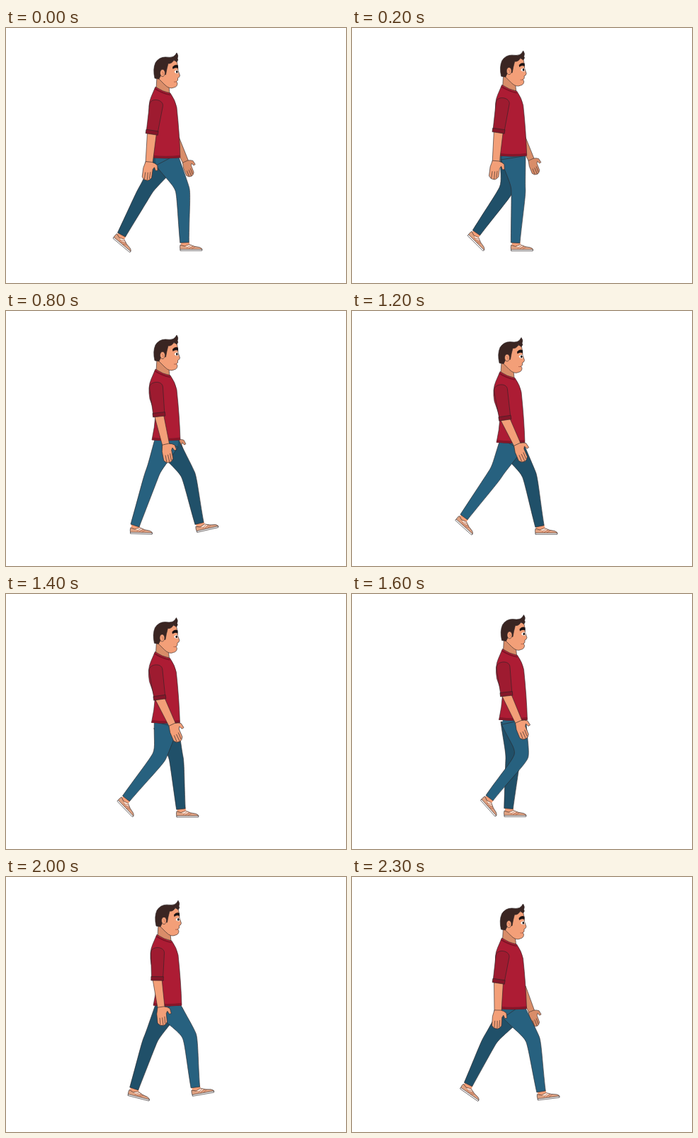
An HTML page that plays this animation: 480x360 px, repeating every 2.4 s.

```html
<!DOCTYPE html>
<html lang="en">
<head>
<meta charset="utf-8">
<title>Walk cycle</title>
<style>
  html, body { margin: 0; width: 100%; height: 100%; overflow: hidden; background: #fff; }
  svg { display: block; width: 480px; height: 360px; }
  path, ellipse { stroke: #2b2426; stroke-width: .6; stroke-linejoin: round; }
  .plain { stroke: none; }
  .line { fill: none; }
  .skin { fill: #f39f78; }
  .shade { fill: #d98d69; }
  .hair { fill: #3a2522; }
  .shirt { fill: #ad1c34; }
  .sleeve { fill: #9e1b30; }
  .cuff { fill: #861629; }
  .near { fill: #27617f; }
  .far { fill: #205069; }
</style>
</head>
<body>
<svg viewBox="0 0 480 360">
  <defs>
    <g id="hand">
      <path d="M-5-2L4-2Q9-1 12 2L13 9 10 9.500 8 5 6 8 5.500 20 3 23 0 24.500-5 23.500-8 20-7.500 7Z"/>
      <path class="line" d="M-4 13L-4.500 23M-.5 13V24M3 12L2.500 22"/>
    </g>
    <g id="foot">
      <path class="skin plain" d="M-5-3H6L8 5H-5Z"/>
      <path fill="#dfa181" d="M-6 3L0 5 7 2.500Q14 6 21 6.500Q25.500 8 25 10.500H-6Q-7 6-6 3Z"/>
      <path fill="#f6ded0" class="plain" d="M1 5L7 2.700 11 5 6 7Z"/>
      <path class="line" style="stroke:#a8583f" d="M3 8L9 3.500M6 8.500L12 5M10 9L15 6"/>
      <path fill="#fff" d="M-6 9.500H25L24.500 11.500H-6Z"/>
    </g>
  </defs>

  <path id="farFore" class="shade"/>
  <use id="farHand" href="#hand" class="shade"/>
  <use id="farFoot" href="#foot"/>
  <path id="farLeg" class="far"/>
  <use id="nearFoot" href="#foot"/>
  <ellipse id="pelvis" class="near plain" rx="16" ry="16"/>
  <path id="nearLeg" class="near"/>

  <g id="torso">
    <path class="shade" d="M213 68L212 86Q221 93 231 92L230 82Z"/>
    <path class="shirt" d="M211 83Q221 90 232 92Q239 102 241 112Q245 150 246 183Q226 185 206 183Q210 165 211 148L203 125Q200 108 205 97Z"/>
    <path class="cuff plain" d="M207 179.500Q226 182 245.700 179.500L246 183Q226 185 206 183Z"/>
    <path class="line" style="stroke:#7a1425;stroke-width:1.500" d="M210 85.500Q220 92 232 94.500"/>
  </g>

  <path id="nearFore" class="skin"/>
  <use id="nearHand" href="#hand" class="skin"/>
  <path id="sleeve" class="sleeve"/>
  <path id="cuff" class="cuff"/>

  <g id="head">
    <path class="skin" d="M226 46L241 46Q243 54 243 60L245.500 67Q245 70 242.500 70.500L242.500 74 240.500 75.500 242 78Q242 83 237 84Q231 87 224 80L214 70 215 58Z"/>
    <path class="hair" d="M210 71Q207 58 211 49Q216 41 225 41Q232 42 236 40.500Q239 39 241 35Q244 39 242 43Q244 45 241 48L237 45Q234 51 229 50L227 58 225.500 66 220 64 216 72Z"/>
    <ellipse class="skin" cx="221" cy="63.500" rx="3.500" ry="5"/>
    <path class="line" style="stroke:#a8583f" d="M220 62Q223 62 221.500 66"/>
    <path fill="#1b1314" class="plain" d="M235 55Q239 50.500 243 53L243 57Q239 55 235.500 58Z"/>
    <path fill="#fff" class="plain" d="M237.500 62Q240 58 243 60V64Q240 65 237.500 62Z"/>
    <ellipse fill="#1b1314" class="plain" cx="241.300" cy="61.800" rx="1.300" ry="1.900"/>
    <path class="line" style="stroke:#8b3d2c" d="M237 76Q239 76.500 241 75.500"/>
  </g>
</svg>
<script>
const LOOP = 2400, STEP = 100;

// time, dx, dy
const body = [
  [0, 0, 0], [500, 2, -5], [800, 0, -1], [1200, -2, 2.5],
  [1600, 1.5, -5.5], [1800, 2.5, -5], [2300, .5, 3]
];
// time, knee x, knee y, ankle x, ankle y, foot angle
const nearLeg = [
  [0, 249, 228, 252, 303, 0], [500, 216, 228, 204, 304, 0],
  [800, 207, 228, 182, 303, 2], [1200, 203, 229, 158, 291, 42],
  [1600, 239, 228, 194, 288, 48], [1800, 257, 222, 242, 293, 15],
  [2100, 259, 226, 272, 299, -15], [2300, 255, 229, 267, 303, -7]
];
const farLeg = [
  [0, 197, 229, 163, 292, 40], [350, 237, 227, 194, 288, 46],
  [500, 250, 223, 230, 297, 18], [800, 257, 231, 273, 300, -13],
  [1200, 250, 231, 265, 304, 0], [1600, 227, 233, 221, 303, 0],
  [1800, 214, 230, 198, 302, 4], [2300, 195, 230, 164, 293, 35]
];
// time, elbow x, elbow y, wrist x, wrist y
const nearArm = [
  [0, 206, 148, 202, 191], [500, 210, 142, 208, 187],
  [800, 216, 147, 226, 190], [1200, 216, 152, 234, 190],
  [1600, 218, 142, 236, 182], [1800, 217, 142, 228, 183],
  [2300, 207, 148, 206, 190]
];
const farArm = [
  [0, 239, 156, 254, 190], [500, 238, 148, 252, 184],
  [800, 229, 148, 241, 184], [1200, 218, 152, 224, 190],
  [1600, 220, 142, 221, 184], [1800, 222, 142, 226, 182],
  [2300, 240, 156, 254, 191]
];

// Looped monotone cubic through the keys
function sample(keys, t) {
  const n = keys.length;
  const time = j => keys[(j + n) % n][0] + Math.floor(j / n) * LOOP;
  const val = (j, c) => keys[(j + n) % n][c];
  let i = n - 1;
  while (keys[i][0] > t) i--;
  const span = time(i + 1) - time(i), u = (t - time(i)) / span;
  return keys[0].slice(1).map((_, k) => {
    const c = k + 1;
    const slope = j => (val(j + 1, c) - val(j, c)) / (time(j + 1) - time(j));
    const a = slope(i - 1), b = slope(i), d = slope(i + 1);
    const tangent = (p, q) => p * q <= 0 ? 0 : 2 * p * q / (p + q);
    const m0 = tangent(a, b) * span, m1 = tangent(b, d) * span;
    const p = val(i, c), rise = val(i + 1, c) - p;
    return p + u * (m0 + u * (3 * rise - 2 * m0 - m1 + u * (m0 + m1 - 2 * rise)));
  });
}

const $ = id => document.getElementById(id);
const set = (id, name, value) => $(id).setAttribute(name, value);
const unit = (a, b) => {
  const x = b[0] - a[0], y = b[1] - a[1], l = Math.hypot(x, y);
  return [x / l, y / l];
};
const go = (p, d, s) => [p[0] + d[0] * s, p[1] + d[1] * s];
const side = (p, d, s) => [p[0] + d[1] * s, p[1] - d[0] * s];
const mid = (a, b) => [(a[0] + b[0]) / 2, (a[1] + b[1]) / 2];
const str = (...pts) => pts.map(p => p.map(v => v.toFixed(2)).join(" ")).join(" ");

function taper(a, b, wa, wb) {
  const d = unit(a, b);
  return "M" + str(side(a, d, wa)) + "L" + str(side(b, d, wb), side(b, d, -wb), side(a, d, -wa)) + "Z";
}

function legPath(hip, knee, ankle) {
  const thigh = unit(hip, knee), shin = unit(knee, ankle);
  const bend = unit([0, 0], [thigh[0] + shin[0], thigh[1] + shin[1]]);
  const edge = s => {
    const h = side(hip, thigh, 17.5 * s), k = side(knee, bend, 10 * s), a = side(ankle, shin, 6.3 * s);
    return { h, k, a, hk: mid(h, k), ka: mid(k, a), up: go(k, bend, -9), down: go(k, bend, 9) };
  };
  const r = edge(1), l = edge(-1);
  return "M" + str(r.h) + "C" + str(r.hk, r.up, r.k) + "C" + str(r.down, r.ka, r.a) +
    "L" + str(l.a) + "C" + str(l.ka, l.down, l.k) + "C" + str(l.up, l.hk, l.h) + "Z";
}

function drawLeg(name, keys, hip, t) {
  const [kx, ky, ax, ay, turn] = sample(keys, t);
  set(name + "Leg", "d", legPath(hip, [kx, ky], [ax, ay]));
  set(name + "Foot", "transform", `translate(${ax} ${ay}) rotate(${turn})`);
}

function drawArm(name, keys, t, scale) {
  const [ex, ey, wx, wy] = sample(keys, t);
  const turn = Math.atan2(wy - ey, wx - ex) * 180 / Math.PI - 90;
  set(name + "Fore", "d", taper([ex, ey], [wx, wy], 6.5 * scale, 5 * scale));
  set(name + "Hand", "transform", `translate(${wx} ${wy}) rotate(${turn}) scale(${scale})`);
  return [ex, ey];
}

function draw(t) {
  const [dx, dy] = sample(body, t);
  const move = `translate(${dx} ${dy})`;
  set("torso", "transform", move);
  set("head", "transform", move);
  set("pelvis", "transform", `translate(${227 + dx} ${186 + dy})`);
  drawArm("far", farArm, t, .85);
  drawLeg("far", farLeg, [226 + dx, 186 + dy], t);
  drawLeg("near", nearLeg, [227 + dx, 186 + dy], t);

  const elbow = drawArm("near", nearArm, t, 1);
  const shoulder = [212 + dx, 109 + dy], d = unit(shoulder, elbow);
  const a = side(shoulder, d, 9.5), b = side(shoulder, d, -9.5);
  set("sleeve", "d", "M" + str(a) + "L" + str(side(elbow, d, 8), side(elbow, d, -8)) +
    "L" + str(b) + "C" + str(go(b, d, -10), go(a, d, -10), a) + "Z");
  set("cuff", "d", taper(go(elbow, d, -3.5), go(elbow, d, 2), 8.7, 8.7));
}

const start = performance.now();
function tick() {
  const t = (performance.now() - start) % LOOP;
  draw(Math.floor(t / STEP) * STEP);
  requestAnimationFrame(tick);
}
tick();
</script>
</body>
</html>
```
